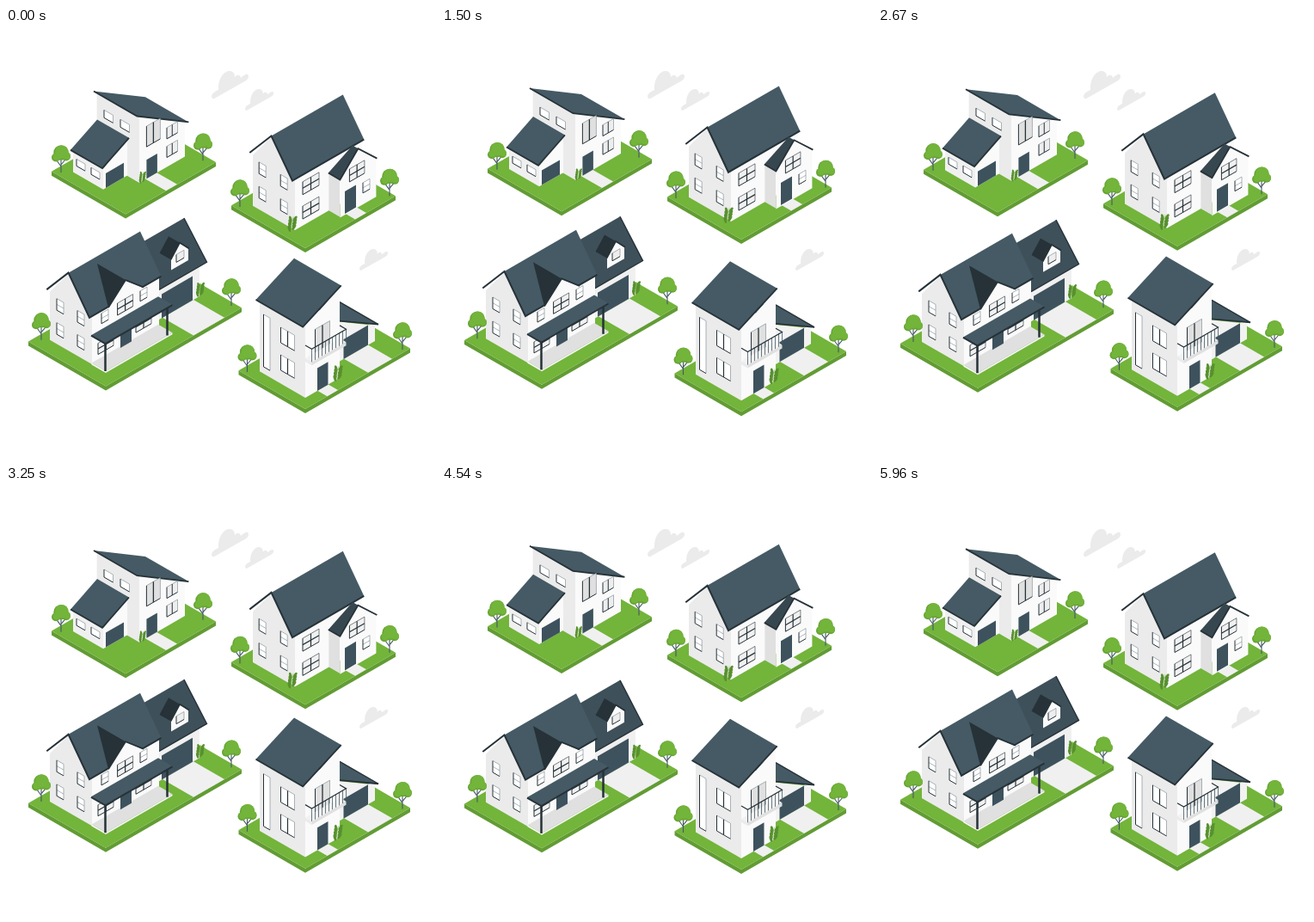
An HTML page that plays this animation: 500 by 500 pixels, repeating every 6000 ms.

```html
<!DOCTYPE html>
<html lang="en">
<head>
<meta charset="utf-8">
<title>Floating houses</title>
<style>
html, body { margin: 0; width: 100%; height: 100%; overflow: hidden; background: #fff; }
svg { display: block; width: 100%; height: 100%; }
</style>
</head>
<body>
<svg id="stage" viewBox="0 0 500 500"></svg>
<script>
const ISO = Math.tan(Math.PI / 6);
const C = {
  lawn: '#73b43b', soil: '#629c34', leaf: '#589030', roof: '#455a64', roofDim: '#3e505a',
  door: '#3d525d', ink: '#263238', frame: '#78858b', shade: '#ebebeb', wall: '#fafafa',
  deep: '#e0e0e0', path: '#f0f0f0', cloud: '#ebebeb'
};

// Isometric drawing around the front corner of a lawn:
// a runs up-left, b runs up-right (both in screen x units), z is height.
class Plot {
  constructor(x, y, depth, width) {
    Object.assign(this, { x, y, depth, width, svg: '' });
    this.box(0, depth, 0, width, -5, 0, C.soil, C.soil, C.lawn);
  }
  xy([a, b, z = 0]) {
    return [this.x - a + b, this.y - (a + b) * ISO - z];
  }
  points(list) {
    return list.map(p => this.xy(p).map(n => n.toFixed(2)).join()).join(' ');
  }
  poly(fill, ...list) {
    this.svg += `<polygon points="${this.points(list)}" fill="${fill}"/>`;
  }
  line(width, stroke, ...list) {
    this.svg += `<polyline points="${this.points(list)}" fill="none" stroke="${stroke}" stroke-width="${width}"/>`;
  }
  floor(a0, a1, b0, b1, z, fill) {
    this.poly(fill, [a0, b0, z], [a0, b1, z], [a1, b1, z], [a1, b0, z]);
  }
  // Upright wall from p to q, with its own height at each end
  wall([a0, b0, z0], [a1, b1, z1], fill, base = 0) {
    this.poly(fill, [a0, b0, z0], [a1, b1, z1], [a1, b1, base], [a0, b0, base]);
  }
  box(a0, a1, b0, b1, z0, z1, leftFill, rightFill, topFill) {
    this.wall([a1, b0, z1], [a0, b0, z1], leftFill, z0);
    this.wall([a0, b0, z1], [a0, b1, z1], rightFill, z0);
    this.floor(a0, a1, b0, b1, z1, topFill);
  }
  // Rectangle on the left or right side of a building, from its upper left corner
  panel(side, [a, b, z], w, h, fill) {
    const at = this.at(side, a, b);
    this.poly(fill, at(0, z), at(w, z), at(w, z - h), at(0, z - h));
  }
  at(side, a, b) {
    return side === 'left' ? (t, z) => [a - t, b, z] : (t, z) => [a, b + t, z];
  }
  win(side, [a, b, z], w, h, { cols = 1, rows = 1, bar = 0.6, ink = C.frame, fill = '#fff' } = {}) {
    const at = this.at(side, a, b);
    this.panel(side, [a, b, z], w, h, fill);
    this.line(0.6, ink, at(0, z), at(w, z), at(w, z - h));
    for (let i = 1; i < cols; i++) this.line(bar, C.ink, at(w * i / cols, z), at(w * i / cols, z - h));
    for (let i = 1; i < rows; i++) this.line(bar, ink, at(0, z - h * i / rows), at(w, z - h * i / rows));
    this.line(1, C.ink, at(0, z), at(0, z - h), at(w, z - h));
  }
  cross(p, w, h) {
    this.win('right', p, w, h, { cols: 2, rows: 2, bar: 1.2, ink: C.ink, fill: '#f1f1f1' });
  }
  sash(side, p, h = 13.5) {
    this.win(side, p, 8, h, { rows: 2 });
  }
  // Sloping roof between two heights along b
  shedRoof(a0, a1, [b0, z0], [b1, z1]) {
    this.poly(C.roof, [a0, b0, z0], [a0, b1, z1], [a1, b1, z1], [a1, b0, z0]);
    this.line(1.8, C.ink, [a1, b0, z0], [a0, b0, z0], [a0, b1, z1]);
  }
  // House with its gable on the left and its ridge along b
  gableHouse(a0, a1, b0, b1, eave, ridge) {
    const mid = (a0 + a1) / 2, edge = b0 - 3, end = b1 + 2.5;
    this.poly(C.shade, [a1, b0, 0], [a1, b0, eave], [mid, b0, ridge], [a0, b0, eave], [a0, b0, 0]);
    this.wall([a0, b0, eave], [a0, b1, eave], C.wall);
    this.poly(C.roof, [a0, edge, eave], [mid, edge, ridge], [mid, end, ridge], [a0, end, eave]);
    this.line(2, C.ink, [a1 + 0.7, edge, eave + 4], [mid, edge, ridge], [a0, edge, eave], [a0, end, eave]);
  }
  // Small gable facing right; its roof reaches back to eaveBack and ridgeBack
  crossGable(a, eaveBack, ridgeBack, b0, b1, base, eave, ridge, fill) {
    const mid = (b0 + b1) / 2;
    this.poly(C.wall, [a, b0, base], [a, b0, eave], [a, mid, ridge], [a, b1, eave], [a, b1, base]);
    this.poly(fill, [a, b0, eave], [a, mid, ridge], [ridgeBack, mid, ridge], [eaveBack, b0, eave]);
    this.line(1.8, C.ink, [eaveBack, b0, eave], [a, b0, eave], [a, mid, ridge], [a, b1 + 1, eave]);
  }
  tree(a, b) {
    const [x, y] = this.xy([a, b]);
    const crown = (fill, dx, r) => [[-6, 3.5, 5], [6, 2.5, 5], [0, -2, 8.7]].map(([cx, cy, size]) =>
      `<circle cx="${cx + dx}" cy="${cy - dx}" r="${size - r}" fill="${fill}"/>`).join('');
    this.svg += `<g transform="translate(${x} ${y - 21})">
      <path d="M0 21V5M0 14L-5 7M0 12L5 6" fill="none" stroke="${C.roof}" stroke-width="1.1"/>
      ${crown('#67a534', 0, 0)}${crown(C.lawn, 0.8, 0.9)}</g>`;
  }
  plant(a, b, size = 1) {
    const [x, y] = this.xy([a, b]);
    let leaves = '';
    for (let i = 0; i < 8; i++) {
      const side = i % 2 ? 1 : -1, up = -3 - i * 1.8;
      leaves += `<ellipse cx="${side * 2.6 + i * 0.25}" cy="${up}" rx="1.6" ry="3.8"
        transform="rotate(${side * 25 + 10} ${side * 2.6} ${up})"/>`;
    }
    this.svg += `<g transform="translate(${x} ${y}) scale(${size})" fill="${C.leaf}">${leaves}
      <path d="M0 0Q-1-9 2-17" fill="none" stroke="#8dc45c" stroke-width=".6"/></g>`;
  }
}

function shedHouse() {
  const p = new Plot(139, 216.5, 86, 105);
  const a = 23.6, b = 39.6;
  p.tree(9, 99);
  p.floor(0, a, 47, 60, 0, C.path);
  p.wall([73, b, 78], [a, b, 78], C.shade);
  p.wall([a, b, 77], [a, 92.6, 40], C.wall);
  p.shedRoof(a, 74, [37, 79], [97, 37.5]);
  for (const wa of [64.6, 45.6]) p.win('left', [wa, b, 61], 10.5, 9);
  p.win('right', [a, 48, 61], 16, 24, { cols: 2, bar: 1.3, fill: C.deep });
  for (const z of [45.6, 24]) p.win('right', [a, 71.6, z], 12.5, 13, { cols: 2, bar: 1, fill: '#eee' });
  p.panel('right', [a, 48, 22], 12.5, 22, C.door);

  p.wall([73, 12, 24], [38, 12, 24], '#f0f0f0');
  p.wall([38, 12, 24], [38, 40, 41], C.wall);
  p.panel('right', [38, 15, 17], 21, 17, C.door);
  p.shedRoof(38, 75, [11, 25], [42, 42.5]);
  for (const wa of [69, 52]) p.win('left', [wa, 12, 17.3], 10, 8);
  p.plant(22, 41, 0.75);
  p.tree(79.5, 4.5);
  return p.svg;
}

function gableHouse() {
  const p = new Plot(348, 256, 86, 105);
  const a = 24.2, b = 12.2, front = 11.6;
  p.floor(0, front, 58, 71, 0, C.path);
  p.gableHouse(a, 73.2, b, 90, 59, 97);
  p.wall([a, 51.6, 44], [front, 51.6, 44], C.deep);
  p.crossGable(front - 1, a, 17, 51, 93, 0, 44, 68, '#37474f');
  for (const z of [55, 26.7]) {
    for (const wa of [66, 41]) p.sash('left', [wa, b, z]);
    p.cross([a, 21.2, z - 4], 19, 15);
  }
  p.cross([front, 63, 49], 17.5, 15);
  p.sash('right', [front, 78.6, 24], 12);
  p.panel('right', [front, 57.6, 26], 13, 26, C.door);
  p.plant(25, 9);
  p.tree(79.5, 3.5);
  p.tree(3.5, 101.5);
  return p.svg;
}

function porchHouse() {
  const p = new Plot(116, 416.5, 90, 158);
  const a = 30, b = 14, step = 13.5, garage = 36;
  p.tree(8, 154);
  p.floor(0, garage, 102, 138, 0, C.path);
  p.wall([garage, 92, 36], [garage, 145, 36], '#f0f0f0');
  p.panel('right', [garage, 101, 28], 36, 28, C.door);
  p.poly(C.roofDim, [35, 88, 36], [35, 152.5, 36], [61.5, 152.5, 72], [61.5, 88, 72]);
  p.line(1.4, C.ink, [61.5, 152.5, 72], [35, 152.5, 36], [35, 97, 36]);
  p.crossGable(40, 53, 53, 116, 136, 45, 58, 71, C.ink);
  p.win('right', [40, 122, 59.5], 9, 9, { fill: '#eee' });

  p.gableHouse(a, 79, b, 92, 56, 94);
  p.crossGable(a, a, 63, 33, 73, 40, 55, 75.5, C.ink);
  for (const z of [52.8, 24.8]) for (const wa of [71, 47]) p.sash('left', [wa, b, z]);
  for (const wb of [25, 70]) p.sash('right', [a, wb, 53], 12);
  p.cross([a, 43.6, 54], 18, 14);

  p.box(step, a, step, 91, 0, 2, C.wall, '#f5f5f5', C.deep);
  for (const wb of [21, 65]) p.cross([a, wb, 20.5], 18, 13);
  p.panel('right', [a, 47, 20], 13, 20, C.door);
  for (const wb of [14, 86]) p.line(2.5, C.ink, [step + 1, wb, 1], [step + 1, wb, 34]);
  p.floor(step, a, 13, 91, 34.5, C.roof);
  p.line(2, C.ink, [a, 13, 34], [step, 13, 34], [step, 91, 34]);
  p.plant(garage, 145, 0.9);
  p.tree(84, 9);
  return p.svg;
}

function towerHouse() {
  const p = new Plot(348, 443, 77.5, 122);
  const a = 11.3, b = 11.3, garage = 28, deck = 46, rail = 61, edge = 3.8;
  p.floor(0, garage, 73, 101, 0, C.path);
  p.floor(0, a, 25.5, 38, 0, C.path);
  p.wall([garage, 68, 46], [garage, 109, 18], '#f2f2f2');
  p.panel('right', [garage, 72.5, 23], 28.5, 23, C.door);
  p.shedRoof(garage, 73, [68, 47], [113, 17]);
  p.line(1.4, C.ink, [garage, 113, 17], [73, 113, 17]);

  p.wall([64.3, b, 83], [a, b, 83], C.shade);
  p.wall([a, b, 83], [a, 51.3, 105], C.wall);
  p.shedRoof(a, 66, [8.5, 84], [53, 106.5]);
  p.win('left', [59.8, b, 69], 7.5, 61);
  for (const z of [65.5, 33.5]) p.win('left', [39.8, b, z], 16, 18, { cols: 2, bar: 1.2 });
  p.win('right', [a, 22.8, 73], 17, 28, { cols: 2, bar: 1.3, fill: C.deep });
  p.panel('right', [a, 25.3, 26.4], 12.5, 26.4, C.door);

  p.box(edge, a, b, 51.3, deck - 4, deck, C.shade, C.deep, '#f2f2f2');
  for (let wb = b; wb <= 51.3; wb += 4) p.line(0.8, C.roof, [edge, wb, deck], [edge, wb, rail]);
  p.line(1.2, C.ink, [a, b, rail], [edge, b, rail], [edge, 51.3, rail], [a, 51.3, rail]);
  p.plant(10, 47);
  p.tree(71, 3.5);
  p.tree(3.3, 116.3);
  return p.svg;
}

const cloud = (x, y, s) => `<path transform="translate(${x} ${y}) scale(${s})" fill="${C.cloud}"
  d="M1 32C-2 28 3 24 8 22C7 11 13 1 20 0C25-.5 27 3 27 7C30 4 33 4 34 8C38 4 43 2 43 6C43 10 39 12 35 14L5 31Q2 33 1 32Z"/>`;

// lowest: time in ms at which the house hangs lowest
const houses = [
  { draw: shedHouse, period: 3000, lowest: 500 },
  { draw: gableHouse, period: 3000, lowest: 0 },
  { draw: porchHouse, period: 6000, lowest: 4000 },
  { draw: towerHouse, period: 3000, lowest: 1000 }
];
const RISE = 10;

function lift(time, { period, lowest }) {
  const phase = ((time - lowest) / period + 1) % 1;
  return -RISE * (1 - Math.abs(1 - 2 * phase));
}

const stage = document.getElementById('stage');
stage.innerHTML = cloud(239, 50, 1) + cloud(278, 71, 0.77) + cloud(411, 257, 0.77)
  + houses.map(house => `<g class="house">${house.draw()}</g>`).join('');
const groups = stage.querySelectorAll('.house');

function render(time) {
  houses.forEach((house, i) => {
    const dy = lift(time, house) - lift(0, house);
    groups[i].setAttribute('transform', `translate(0 ${dy.toFixed(3)})`);
  });
}

const start = performance.now();
function tick() {
  render((performance.now() - start) % 6000);
  requestAnimationFrame(tick);
}
render(0);
requestAnimationFrame(tick);
</script>
</body>
</html>
```
